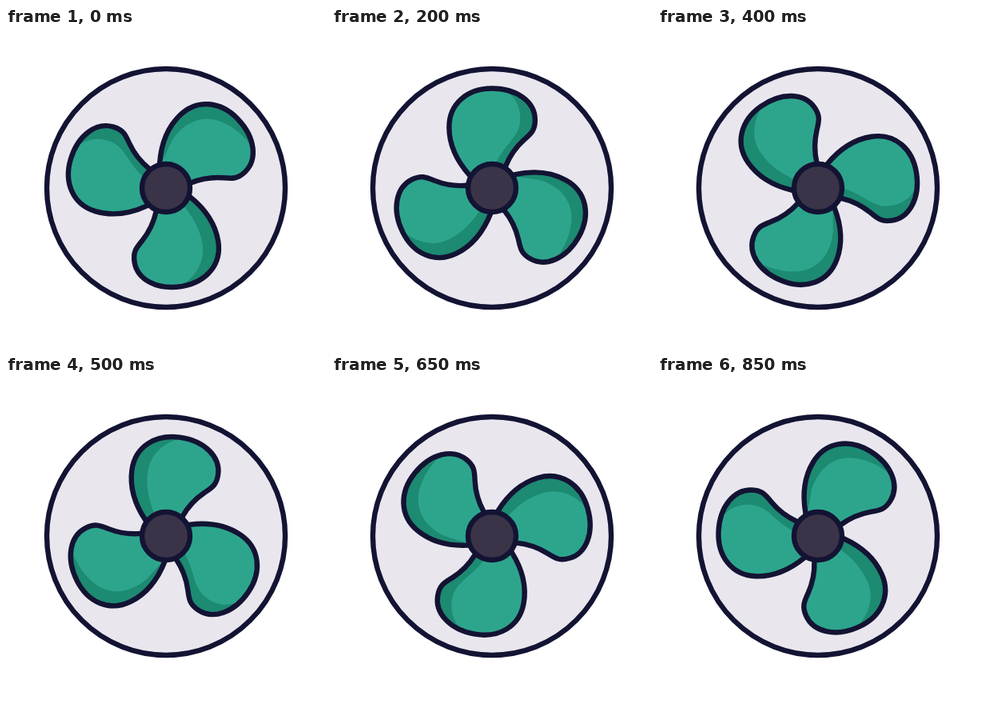
Animation of 400 by 400 pixels, one loop 900 ms. Source, as an HTML page with a canvas:

```html
<!DOCTYPE html>
<html lang="en">
<head>
<meta charset="utf-8">
<title>Spinning fan</title>
<style>
  html, body { margin: 0; width: 100%; height: 100%; overflow: hidden; background: #fff; }
  canvas { display: block; width: 400px; height: 400px; }
</style>
</head>
<body>
<canvas id="stage"></canvas>
<script>
const LOOP = 900, STEP = 50;
const INK = '#131333', DISC = '#eae6ee', HUB = '#3b3449';
const TEAL = '#2da58d', SHADE = '#1d8a72';

const canvas = document.getElementById('stage');
const ctx = canvas.getContext('2d');
const scale = window.devicePixelRatio || 1;
canvas.width = canvas.height = 400 * scale;

// Blade pointing up, with the fan centre at the origin.
const blade = new Path2D(`M0 0 L-28 -16 C-45 -35 -53.5 -55 -53.5 -76
  C-53.5 -106 -30 -124.5 0 -124.5 C32 -124.5 54 -107 54 -85
  C54 -72 49 -68 40 -60 C30 -51 23 -42 17 -27 Z`);

const blades = [
  { angle: 0, shade: 'M4 -130 L4 -126 C28 -122 38 -100 35 -80 C31 -60 12 -52 2 -24 L70 -20 L70 -130 Z' },
  { angle: 119.2, shade: 'M40 -130 L37 -113 C18 -116 -6 -113 -22 -101 C-38 -88 -43 -68 -37 -45 L-28 -22 L-70 -10 L-70 -130 Z' },
  { angle: 243.7, shade: 'M4 -130 L2 -124 C-18 -116 -33 -99 -33.5 -78 C-34 -58 -27 -40 -16 -22 L-70 -10 L-70 -130 Z' }
].map(b => ({ angle: b.angle, shade: new Path2D(b.shade) }));

// Time in ms and degrees turned: slow near the seam, faster midway.
const keys = [[0, 0], [200, 73], [400, 154.5], [550, 219], [650, 263], [750, 306], [850, 345.5]];
const START = -73.1;

function key(i) {
  const n = keys.length, turn = Math.floor(i / n);
  const [t, a] = keys[i - turn * n];
  return [t + turn * LOOP, a + turn * 360];
}

function slope(i) {
  const [t0, a0] = key(i - 1), [t1, a1] = key(i), [t2, a2] = key(i + 1);
  const before = t1 - t0, after = t2 - t1;
  return ((a1 - a0) / before * after + (a2 - a1) / after * before) / (before + after);
}

function turnAt(t) {
  let i = keys.length - 1;
  while (keys[i][0] > t) i--;
  const [t0, a0] = key(i), [t1, a1] = key(i + 1);
  const span = t1 - t0, u = (t - t0) / span, v = 1 - u;
  return a0 * v * v * (1 + 2 * u) + a1 * u * u * (1 + 2 * v)
    + span * u * v * (slope(i) * v - slope(i + 1) * u);
}

function circle(radius, fill) {
  ctx.beginPath();
  ctx.arc(0, 0, radius, 0, Math.PI * 2);
  ctx.fillStyle = fill;
  ctx.fill();
  ctx.stroke();
}

function drawBlade({ angle, shade }, turn) {
  ctx.save();
  ctx.rotate((angle + turn) * Math.PI / 180);
  ctx.fillStyle = TEAL;
  ctx.fill(blade);
  ctx.save();
  ctx.clip(blade);
  ctx.fillStyle = SHADE;
  ctx.fill(shade);
  ctx.restore();
  ctx.stroke(blade);
  ctx.restore();
}

function draw(t) {
  ctx.setTransform(scale, 0, 0, scale, 0, 0);
  ctx.fillStyle = '#fff';
  ctx.fillRect(0, 0, 400, 400);
  ctx.translate(200, 200);
  ctx.strokeStyle = INK;
  ctx.lineWidth = 6.4;
  ctx.lineJoin = 'round';
  circle(149, DISC);
  const turn = START + turnAt(t);
  blades.forEach(b => drawBlade(b, turn));
  circle(30, HUB);
}

const begin = performance.now();
function frame() {
  const t = Math.max(0, performance.now() - begin) % LOOP;
  draw(Math.floor(t / STEP) * STEP);
  requestAnimationFrame(frame);
}
frame();
</script>
</body>
</html>
```
